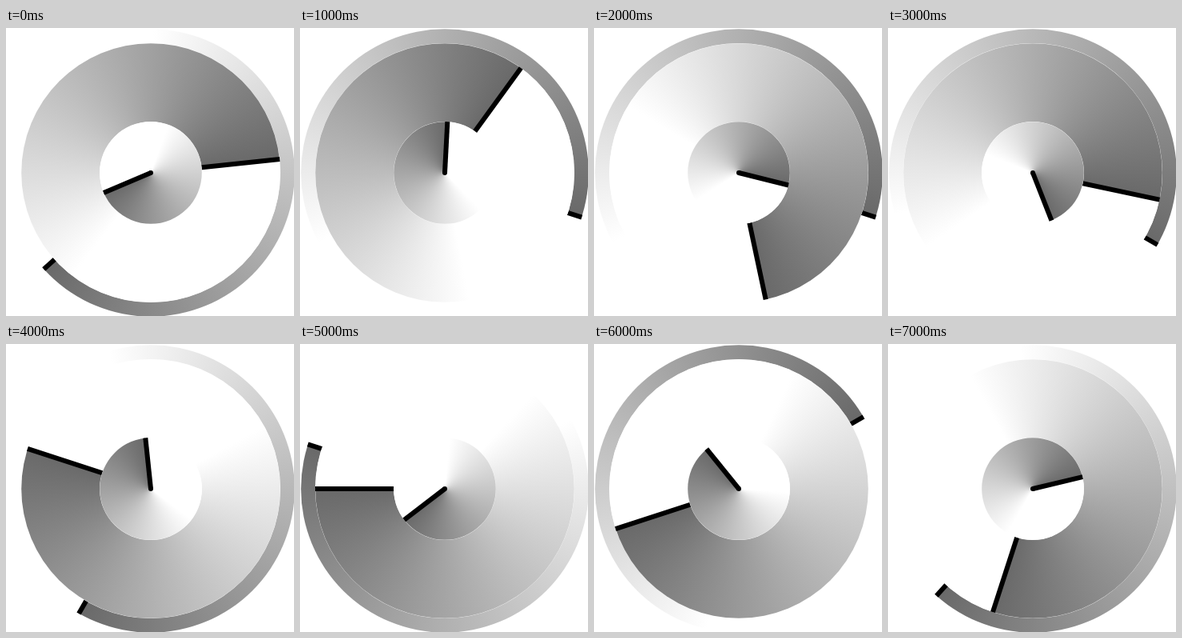
Recreate the animation shown at these times as an HTML page with a canvas. Size 360 px wide and 360 px high, loop 8000 ms.

```html
<!DOCTYPE html>
<html lang="en">
<head>
<meta charset="utf-8">
<title>Gradient clock</title>
<style>
html, body { margin: 0; width: 100%; height: 100%; overflow: hidden; background: #fff; }
canvas { display: block; width: 360px; height: 360px; }
</style>
</head>
<body>
<canvas id="clock" width="360" height="360"></canvas>
<script>
const ctx = document.getElementById('clock').getContext('2d');
const CENTER = 181;
const STEP = 1000;
const TAIL = 227 / 360;
const TIMES = [
  [8, 14, 38], [0, 6, 18], [3, 28, 18], [5, 17, 20],
  [11, 48, 35], [7, 45, 48], [10, 42, 10], [2, 33, 37]
];

function disc(radius, fill) {
  ctx.fillStyle = fill;
  ctx.beginPath();
  ctx.arc(0, 0, radius, 0, Math.PI * 2);
  ctx.fill();
}

// A disc shaded behind its hand; turn is a clockwise fraction from the top.
function dial(radius, turn) {
  const angle = (turn - 0.25) * Math.PI * 2;
  const shade = ctx.createConicGradient(angle, 0, 0);
  shade.addColorStop(0, '#fff');
  shade.addColorStop(1 - TAIL, '#fff');
  shade.addColorStop(1, 'rgb(105,105,105)');
  disc(radius, '#fff');
  disc(radius - 0.2, shade);

  ctx.save();
  ctx.rotate(angle);
  ctx.fillStyle = '#000';
  ctx.fillRect(0, -3, radius, 6);
  ctx.restore();
  disc(3, '#000');
}

function draw([h, m, s]) {
  ctx.setTransform(1, 0, 0, 1, 0, 0);
  ctx.fillStyle = '#fff';
  ctx.fillRect(0, 0, 360, 360);
  ctx.translate(CENTER, CENTER);
  dial(180, s / 60);
  dial(162, m / 60);
  dial(64, (h + m / 60) / 12);
}

const start = performance.now();
function tick() {
  const elapsed = performance.now() - start;
  draw(TIMES[Math.floor(elapsed / STEP) % TIMES.length]);
  requestAnimationFrame(tick);
}
tick();
</script>
</body>
</html>
```
